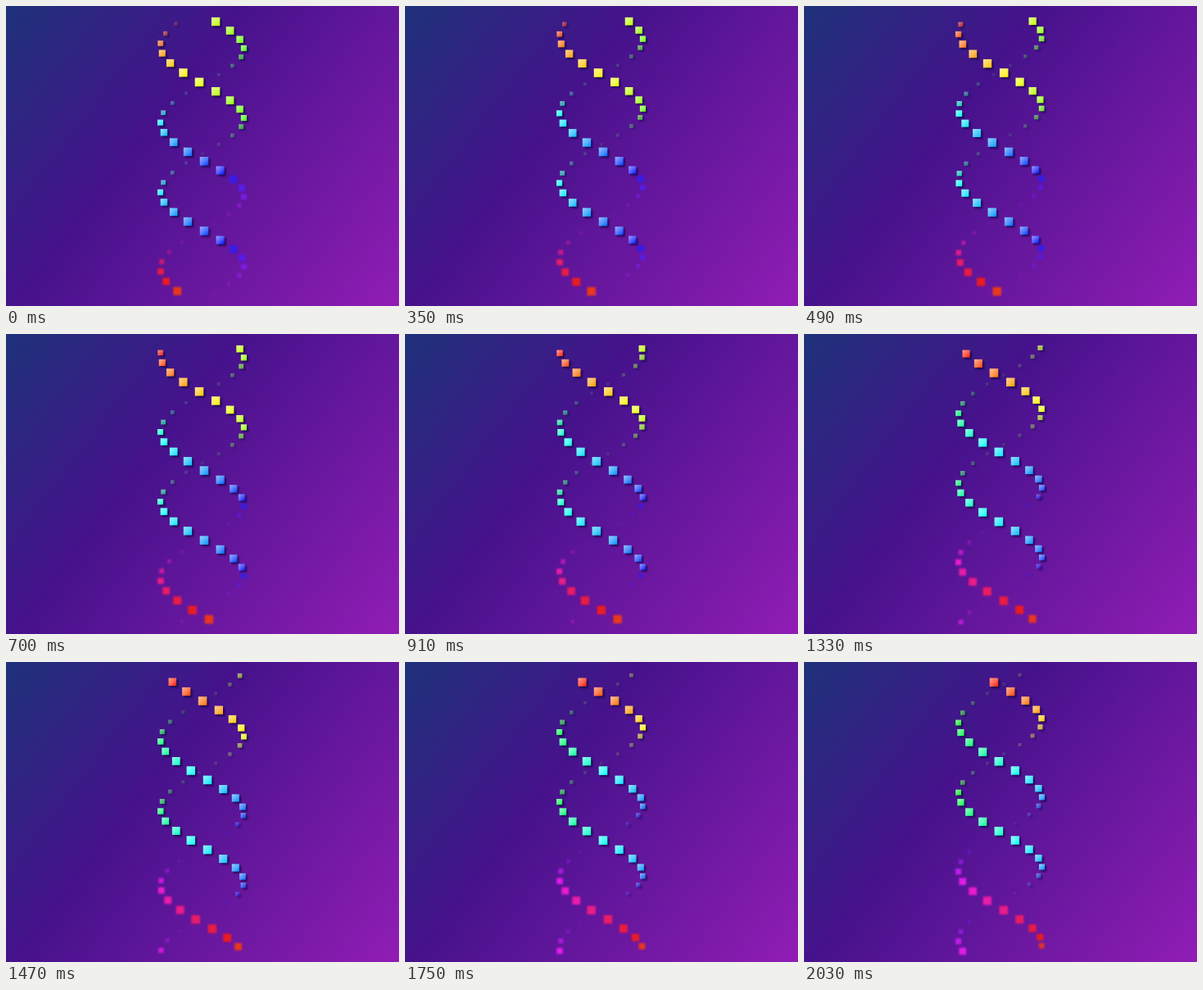
Recreate the animation shown at these times as an HTML page. Size 480 by 366 pixels, loop 2.1 s.

```html
<!DOCTYPE html>
<html lang="en">
<head>
<meta charset="utf-8">
<title>Rainbow helix</title>
<style>
  html, body { margin: 0; width: 100%; height: 100%; overflow: hidden; background: #47128c; }
  svg { display: block; width: 100vw; height: 100vh; }
</style>
</head>
<body>
<svg id="stage" viewBox="0 0 480 366" preserveAspectRatio="none">
  <defs>
    <linearGradient id="sky" gradientUnits="userSpaceOnUse" x1="0" y1="0" x2="480" y2="366">
      <stop offset="0" stop-color="#1e327a"/>
      <stop offset=".38" stop-color="#46128c"/>
      <stop offset="1" stop-color="#911db5"/>
    </linearGradient>
    <linearGradient id="sheen" x1="0" y1="0" x2="1" y2="1">
      <stop offset="0" stop-color="#fff" stop-opacity=".6"/>
      <stop offset=".55" stop-color="#fff" stop-opacity=".3"/>
      <stop offset="1" stop-color="#fff" stop-opacity="0"/>
    </linearGradient>
    <filter id="blur" filterUnits="userSpaceOnUse" x="0" y="0" width="480" height="366">
      <feGaussianBlur stdDeviation="1.3"/>
    </filter>
    <filter id="soft" filterUnits="userSpaceOnUse" x="0" y="0" width="480" height="366">
      <feGaussianBlur stdDeviation=".9"/>
    </filter>
  </defs>
  <rect width="480" height="366" fill="url(#sky)"/>
  <g id="shadows" filter="url(#blur)"></g>
  <g id="glowing" filter="url(#soft)"></g>
  <g id="solid"></g>
</svg>
<script>
const LOOP = 2100, STEP = 70;
const ROWS = 30, PITCH = 11.345, TWIST = 0.4, TURN_PER_STEP = 0.08;
const CENTER_X = 239.5, RADIUS = 51, TOP = 17.4;
const START_ANGLE = 0.332, STRAND_LAG = 7;

const layer = id => document.getElementById(id);

function add(parent, tag, attrs = {}) {
  const node = document.createElementNS("http://www.w3.org/2000/svg", tag);
  for (const name in attrs) node.setAttribute(name, attrs[name]);
  return parent.appendChild(node);
}

function unitSquare(parent, fill) {
  return add(parent, "rect", { x: -0.5, y: -0.5, width: 1, height: 1, fill });
}

function makeDot(row, lagging) {
  const tint = lagging ? row : row + STRAND_LAG;
  const glows = tint > 23;
  const hue = 10.1 * tint + 5;
  const body = add(layer(glows ? "glowing" : "solid"), "g");
  unitSquare(body, `hsl(${hue}, ${glows ? 82 : 100}%, 51%)`);
  if (!glows) unitSquare(body, "url(#sheen)");
  return {
    body,
    shadow: glows ? null : unitSquare(layer("shadows"), "#0a0430"),
    angle: START_ANGLE + TWIST * (lagging ? row - STRAND_LAG : row),
    y: TOP + PITCH * (lagging ? row + 0.5 : row)
  };
}

function place(node, x, y, size, opacity) {
  node.setAttribute("transform", `translate(${x.toFixed(2)} ${y.toFixed(2)}) scale(${size.toFixed(2)})`);
  node.setAttribute("opacity", opacity.toFixed(3));
}

const dots = [];
for (let row = 0; row < ROWS; row++) dots.push(makeDot(row, false), makeDot(row, true));

function render(time) {
  const turn = Math.floor((time % LOOP) / STEP) * TURN_PER_STEP;
  for (const dot of dots) {
    const depth = Math.cos(dot.angle + turn);
    const x = CENTER_X + RADIUS * Math.sin(dot.angle + turn);
    const y = dot.y + 1.75 * depth;
    const size = 7 + 3.5 * depth;
    const opacity = Math.min(1, Math.max(0.1, 1 + 0.9 * depth));
    place(dot.body, x, y, size, opacity);
    if (dot.shadow) place(dot.shadow, x + 2.2, y + 2.2, size, opacity * 0.6);
  }
}

const start = performance.now();
function tick() {
  render(performance.now() - start);
  requestAnimationFrame(tick);
}
tick();
</script>
</body>
</html>
```
